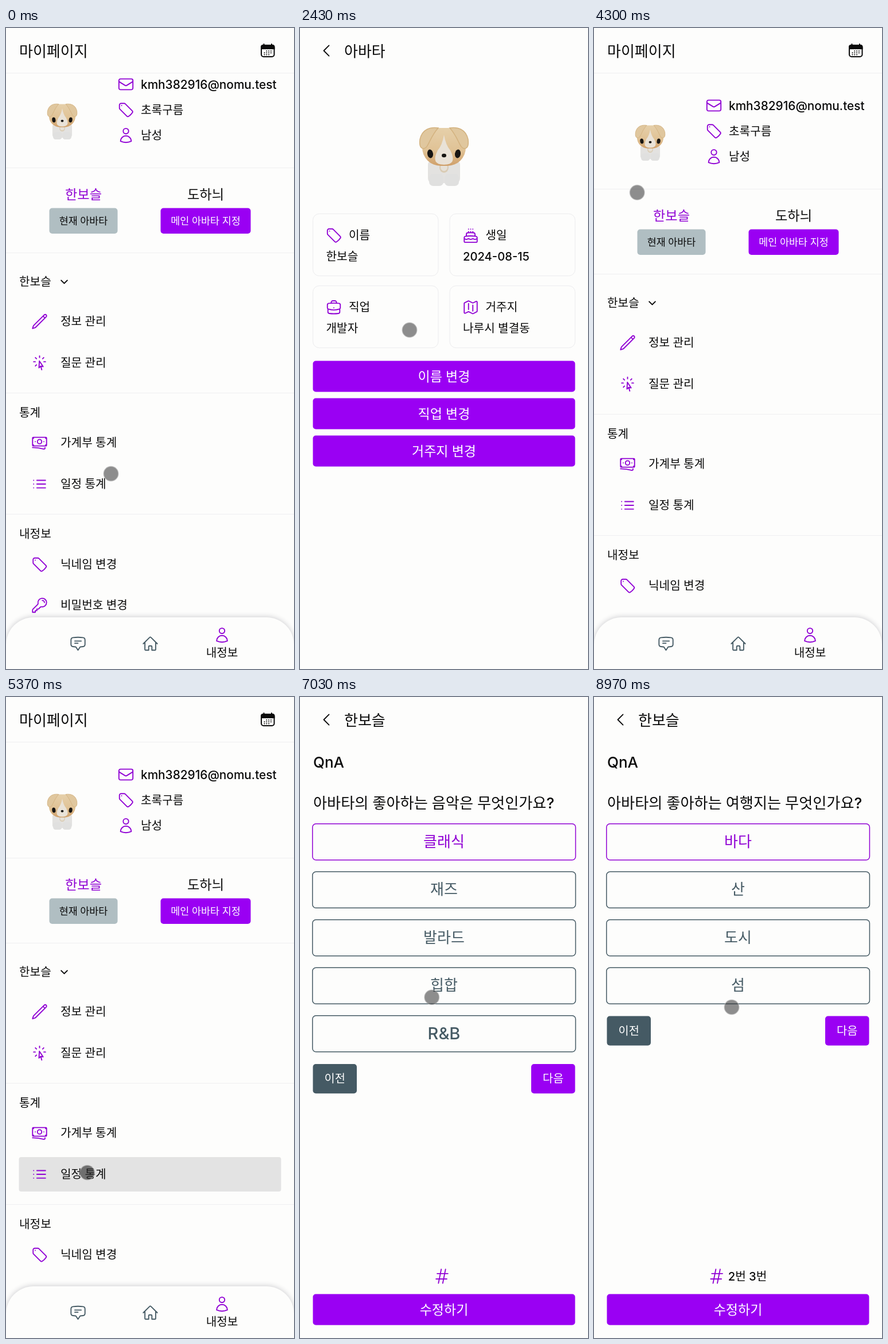
Recreate the animation shown at these times as an HTML page with a canvas. Size 502 px wide and 1116 px high, loop 9010 ms.

```html
<!DOCTYPE html>
<html lang="ko">
<head>
<meta charset="utf-8">
<style>
html, body { margin: 0; width: 100%; height: 100%; overflow: hidden; background: #fdfdfd; }
canvas { display: block; width: 502px; height: 1116px; }
</style>
</head>
<body>
<canvas id="stage" width="502" height="1116"></canvas>
<script>
const ctx = document.getElementById('stage').getContext('2d');
const LOOP = 9010;
const PAPER = '#fdfdfc', INK = '#0a0a0a', PURPLE = '#9a00f3', VIOLET = '#9000d4', SLATE = '#455a64', LINE = '#efeff1';
const FONT = 'Inter, "Noto Sans CJK KR", "Noto Sans CJK", sans-serif';
const USER = '한보슬', PARTNER = '도하늬';

const ICONS = {
  mail: 'M4.5 4.5h15a2.25 2.25 0 0 1 2.25 2.25v10.5a2.25 2.25 0 0 1-2.25 2.25h-15a2.25 2.25 0 0 1-2.25-2.25V6.75A2.25 2.25 0 0 1 4.5 4.5ZM2.25 7a2.3 2.3 0 0 0 1.07 1.9l7.5 4.6a2.25 2.25 0 0 0 2.36 0l7.5-4.6A2.3 2.3 0 0 0 21.75 7',
  tag: 'M9.57 3H5.25A2.25 2.25 0 0 0 3 5.25v4.32c0 .6.24 1.17.66 1.59l9.58 9.58c.7.7 1.78.87 2.6.33a18 18 0 0 0 5.23-5.22c.54-.83.37-1.91-.33-2.61L11.16 3.66A2.25 2.25 0 0 0 9.57 3ZM6 6h.01',
  user: 'M15.75 6a3.75 3.75 0 1 1-7.5 0 3.75 3.75 0 0 1 7.5 0ZM4.5 20.1a7.5 7.5 0 0 1 15 0A18 18 0 0 1 12 21.75 18 18 0 0 1 4.5 20.1Z',
  pencil: 'm16.86 4.49 1.69-1.69a1.87 1.87 0 1 1 2.65 2.65L6.83 19.82a4.5 4.5 0 0 1-1.9 1.13l-2.68.8.8-2.68a4.5 4.5 0 0 1 1.13-1.9L16.86 4.49Zm0 0L19.5 7.13',
  rays: 'M15.04 21.67 13.68 16.6m0 0-2.51 2.22.57-9.47 5.23 7.92-3.29-.67ZM12 2.25V4.5m5.83.17-1.59 1.59M20.25 10.5H18M7.76 14.74l-1.59 1.59M6 10.5H3.75m4-4.24-1.59-1.59',
  cash: 'M3.4 4.5h17.2a1.1 1.1 0 0 1 1.15 1.1v9.8a1.1 1.1 0 0 1-1.15 1.1H3.4a1.1 1.1 0 0 1-1.15-1.1V5.6A1.1 1.1 0 0 1 3.4 4.5ZM2.25 6H3a.75.75 0 0 0 .75-.75V4.5M20.25 4.5v.75A.75.75 0 0 0 21 6h.75M2.25 15H3a.75.75 0 0 1 .75.75v.75M20.25 16.5v-.75A.75.75 0 0 1 21 15h.75M15 10.5a3 3 0 1 1-6 0 3 3 0 0 1 6 0ZM6 10.5h.01M18 10.5h.01M2.25 18.75a60 60 0 0 1 15.8 2.1q1.45.25 1.45-1.1v-1',
  list: 'M8.25 6.75h12M8.25 12h12M8.25 17.25h12M3.75 6.75h.01M3.75 12h.01M3.75 17.25h.01',
  key: 'M15.75 5.25a3 3 0 0 1 3 3m3 0a6 6 0 0 1-7.03 5.9c-.56-.1-1.16.03-1.56.43L10.5 17.25H8.25v2.25H6v2.25H2.25v-2.8c0-.6.24-1.17.66-1.6l6.5-6.5c.4-.4.53-1 .43-1.56A6 6 0 1 1 21.75 8.25Z',
  cake: 'M6 13v-2.4a2.2 2.2 0 0 1 2-2.2q4-.3 8 0a2.2 2.2 0 0 1 2 2.2V13M9 8.25v-1.5M12 8.25v-1.5M15 8.25v-1.5M9 3.3h.01M12 3.3h.01M15 3.3h.01M3 20.6v-5.1a2.2 2.2 0 0 1 1.8-2.2q7.2-1.1 14.4 0a2.2 2.2 0 0 1 1.8 2.2v5.1a1.1 1.1 0 0 1-1.1 1.1H4.1A1.1 1.1 0 0 1 3 20.6ZM3 16.5l1.5.75q1.5.9 3 0t3 0 3 0 3 0 3 0L21 16.5',
  bag: 'M8.25 6.15v-.9A2.25 2.25 0 0 1 10.5 3h3a2.25 2.25 0 0 1 2.25 2.25v.9M4.8 6.5q7.2-.9 14.4 0A2.2 2.2 0 0 1 21 8.7v3.8q0 1.6-1.4 2-7.6 2.4-15.2 0Q3 14.1 3 12.5V8.7A2.2 2.2 0 0 1 4.8 6.5ZM3.75 14.2v4.2a2.2 2.2 0 0 0 1.9 2.2q6.35.8 12.7 0a2.2 2.2 0 0 0 1.9-2.2v-4.2M12 12.75h.01',
  map: 'M9 6.75V15m6-6v8.25m.5 3.5 4.88-2.44c.38-.19.62-.58.62-1V4.82c0-.84-.88-1.38-1.63-1l-3.87 1.93a1.1 1.1 0 0 1-1 0l-5-2.5a1.1 1.1 0 0 0-1 0L3.62 5.69C3.24 5.88 3 6.27 3 6.7v12.48c0 .84.88 1.38 1.63 1l3.87-1.93a1.1 1.1 0 0 1 1 0l5 2.5a1.1 1.1 0 0 0 1 0Z',
  chat: 'M7.5 8.25h9m-9 3H12M5 3.5q7-1 14 0a3.3 3.3 0 0 1 2.75 3.25v6A3.3 3.3 0 0 1 19 16q-1.7.25-3.4.37a1.1 1.1 0 0 0-.85.5L12 21l-2.75-4.13a1.1 1.1 0 0 0-.85-.5Q6.7 16.25 5 16a3.3 3.3 0 0 1-2.75-3.25v-6A3.3 3.3 0 0 1 5 3.5Z',
  home: 'm2.25 12 8.95-8.95a1.1 1.1 0 0 1 1.6 0L21.75 12M4.5 9.75v10.1A1.1 1.1 0 0 0 5.6 21h4.15v-4.9a1.1 1.1 0 0 1 1.1-1.1h2.3a1.1 1.1 0 0 1 1.1 1.1V21h4.15a1.1 1.1 0 0 0 1.1-1.1V9.75',
  hash: 'M5.25 8.25h15m-16.5 7.5h15m-1.8-13.5-3.9 19.5m-2.1-19.5-3.9 19.5',
  back: 'M15.75 19.5 8.25 12l7.5-7.5',
  down: 'm19.5 8.25-7.5 7.5-7.5-7.5'
};
for (const name in ICONS) ICONS[name] = new Path2D(ICONS[name]);

// Pointer stops: time, x, y
const STOPS = [
  [0, 183, 776], [450, 150, 513], [750, 150, 513], [1170, 281, 487], [1750, 255, 738], [2100, 255, 738],
  [3000, 46, 45], [3250, 46, 42], [3470, 47, 109], [3620, 46, 42], [3800, 46, 42], [5150, 140, 828],
  [5450, 142, 828], [6000, 213, 598], [6300, 160, 594], [6650, 160, 594], [7200, 250, 502], [7400, 250, 502],
  [7750, 442, 665], [7900, 442, 665], [8250, 270, 252], [8500, 270, 252], [8970, 240, 540], [LOOP, 237, 552]
];
const PRESSES = [[550, 700], [1850, 2000], [3100, 3250], [3660, 3760], [5200, 5500], [6400, 6560], [7280, 7380], [7780, 7880], [8320, 8430]];

const ease = (t, from, to) => {
  const p = Math.min(1, Math.max(0, (t - from) / (to - from)));
  return p * p * (3 - 2 * p);
};
const isPressed = t => PRESSES.some(([from, to]) => t >= from && t < to);

function text(str, x, y, size = 20.2, color = INK, align = 'left') {
  ctx.font = `500 ${size}px ${FONT}`;
  ctx.fillStyle = color;
  ctx.textAlign = align;
  ctx.fillText(str, x, y + size * 0.37);
}

function icon(name, x, y, color = VIOLET, size = 30, width = 1.5) {
  ctx.save();
  ctx.translate(x - size / 2, y - size / 2);
  ctx.scale(size / 24, size / 24);
  ctx.strokeStyle = color;
  ctx.lineWidth = width;
  ctx.lineCap = ctx.lineJoin = 'round';
  ctx.stroke(ICONS[name]);
  ctx.restore();
}

function box(x, y, w, h, r, fill, stroke, width = 1) {
  ctx.beginPath();
  ctx.roundRect(x, y, w, h, r);
  if (fill) { ctx.fillStyle = fill; ctx.fill(); }
  if (stroke) { ctx.strokeStyle = stroke; ctx.lineWidth = width; ctx.stroke(); }
}

function button(label, x, y, w, h, size, fill = PURPLE, color = '#fff') {
  box(x, y, w, h, 5, fill);
  text(label, x + w / 2, y + h / 2 - 0.5, size, color, 'center');
}

function oval(x, y, rx, ry, fill, turn = 0) {
  ctx.beginPath();
  ctx.ellipse(x, y, rx, ry, turn, 0, 7);
  ctx.fillStyle = fill;
  ctx.fill();
}

function divider(y) {
  ctx.fillStyle = LINE;
  ctx.fillRect(0, y, 502, 1);
}

function dog(x, y, scale) {
  ctx.save();
  ctx.translate(x, y);
  ctx.scale(scale, scale);
  box(-28, 6, 56, 40, 8, '#e3e2e0');
  box(-26, 30, 25, 21, 7, '#e0e0df');
  box(1, 30, 25, 21, 7, '#e0e0df');
  oval(0, 19, 8, 9, '#d9cbb3');
  oval(0, 18, 6, 7, '#e6e1d8');
  const fur = ctx.createLinearGradient(0, -50, 0, 16);
  fur.addColorStop(0, '#e6d0aa');
  fur.addColorStop(0.6, '#e0c295');
  fur.addColorStop(1, '#cf9f69');
  box(-38, -50, 76, 66, [30, 30, 32, 32], fur);
  ctx.fillStyle = '#e9e2d7';
  ctx.fill(new Path2D('M0-38Q3-20 11-11Q24 14 0 14Q-24 14-11-11Q-3-20 0-38Z'));
  for (const side of [-1, 1]) {
    ctx.save();
    ctx.scale(side, 1);
    ctx.fillStyle = '#e0c79e';
    ctx.strokeStyle = '#d3b27f';
    const ear = new Path2D('M10-50C24-52 38-48 42-30Q44-14 35-14C27-15 25-34 10-50Z');
    ctx.fill(ear);
    ctx.stroke(ear);
    oval(24, -5, 5, 7.5, '#171513', 0.15);
    ctx.restore();
  }
  oval(0, -2, 4, 3.3, '#171513');
  ctx.restore();
}

function calendar() {
  box(445, 30, 22.5, 20, 4, PAPER, INK, 2);
  box(444, 29, 24.5, 8, [4, 4, 0, 0], INK);
  box(448.5, 27, 2, 4, 1, INK);
  box(462, 27, 2, 4, 1, INK);
  for (let i = 0; i < 12; i++) {
    if (i !== 0 && i !== 11) oval(450.5 + i % 4 * 3.8, 40 + Math.floor(i / 4) * 3.2, 1, 1, INK);
  }
}

function myPage(t) {
  const scroll = t < 700 ? 37 : 27 * ease(t, 5600, 5980);
  ctx.save();
  ctx.translate(0, -scroll);
  if (t < 700 || t > 4000) dog(98, 200, 0.61);
  icon('mail', 209, 135);
  text('kmh382916@nomu.test', 235, 135, 20.8);
  icon('tag', 209, 179.5);
  text('초록구름', 235, 179.5);
  icon('user', 209, 224);
  text('남성', 235, 224);
  [280, 428, 672, 883].forEach(divider);
  text(USER, 135, 326, 23.2, VIOLET, 'center');
  text(PARTNER, 348, 326, 23.2, INK, 'center');
  button('현재 아바타', 75.5, 350.5, 119, 44.5, 17.4, '#b0bec2', INK);
  button('메인 아바타 지정', 269.5, 350.5, 157, 44.5, 17.4);
  text(USER, 23, 478.5);
  icon('down', 101.5, 479, INK, 17, 2.8);
  text('통계', 23, 706.5);
  text('내정보', 23, 917.5);
  const rows = [['pencil', '정보 관리', 548], ['rays', '질문 관리', 620], ['cash', '가계부 통계', 759],
    ['list', '일정 통계', 831], ['tag', '닉네임 변경', 971], ['key', '비밀번호 변경', 1042]];
  const active = !isPressed(t) ? -1 : t < 700 ? 0 : t > 6000 ? 1 : t > 5000 ? 3 : -1;
  rows.forEach(([name, label, y], i) => {
    if (i === active) box(22.5, y - 30, 457, 60, 4, '#e3e3e3');
    icon(name, 58.5, y);
    text(label, 95, y);
  });
  ctx.restore();

  ctx.fillStyle = PAPER;
  ctx.fillRect(0, 0, 502, 79);
  divider(78);
  text('마이페이지', 23, 40, 26);
  calendar();

  ctx.save();
  ctx.shadowColor = 'rgba(40,40,60,.22)';
  ctx.shadowBlur = 9;
  ctx.shadowOffsetY = -1;
  box(0, 1026, 502, 120, [48, 48, 0, 0], PAPER);
  ctx.restore();
  icon('chat', 125.5, 1072, SLATE);
  icon('home', 251.5, 1072, SLATE);
  icon('user', 376.5, 1057);
  text('내정보', 376.5, 1088, 20.2, INK, 'center');
}

function subHeader(title) {
  icon('back', 46, 39.5, INK, 29, 1.5);
  text(title, 77, 40, 26);
}

function avatarPage(t) {
  subHeader('아바타');
  if (t > 900 && t < 3250) dog(251, 224, 1);
  const cards = [['tag', '이름', USER], ['cake', '생일', '2024-08-15'], ['bag', '직업', '개발자'], ['map', '거주지', '나루시 별결동']];
  cards.forEach(([name, label, value], i) => {
    const x = 22.5 + i % 2 * 238.5, y = 323.5 + (i >> 1) * 125.3;
    box(x, y, 218.5, 108, 11, null, '#ececee');
    icon(name, x + 36.5, y + 37.5);
    text(label, x + 62.5, y + 37);
    text(value, x + 23, y + 74);
  });
  ['이름', '직업', '거주지'].forEach((what, i) => button(what + ' 변경', 22.5, 579.5 + i * 65, 457, 54, 23));
}

function quizPage(t) {
  const second = t < 7880;
  const options = second ? ['클래식', '재즈', '발라드', '힙합', 'R&B'] : ['바다', '산', '도시', '섬'];
  const chosen = second ? (t < 7380 ? 0 : 3) : (t < 8430 ? 1 : 0);
  const edited = t < 7380 ? '' : t < 8430 ? '2번' : '2번 3번';
  subHeader(USER);
  text('QnA', 23, 113, 26);
  text(`아바타의 좋아하는 ${second ? '음악은' : '여행지는'} 무엇인가요?`, 23, 184, 26.2);
  options.forEach((label, i) => {
    const y = 220.8 + i * 83.5;
    const color = i === chosen ? VIOLET : SLATE;
    box(21.8, y, 458.6, 63, 6, null, color, 1.5);
    text(label, 251, y + 30.5, label === 'R&B' ? 29 : 26, color, 'center');
  });
  const y = 221.5 + options.length * 83.5;
  button('이전', 22.5, y, 76.5, 51.3, 19.8, SLATE);
  button('다음', 403, y, 76.5, 51.3, 19.8);
  ctx.font = `500 20.2px ${FONT}`;
  const x = 267.5 - ctx.measureText(edited).width / 2;
  icon('hash', x - 20, 1008.5);
  text(edited, x, 1008.5);
  button('수정하기', 22.5, 1039.5, 457, 54, 23);
}

function pointer(t) {
  const next = Math.max(1, STOPS.findIndex(stop => stop[0] > t));
  const [t0, x0, y0] = STOPS[next - 1], [t1, x1, y1] = STOPS[next];
  const p = ease(t, t0, t1);
  ctx.beginPath();
  ctx.arc(x0 + (x1 - x0) * p, y0 + (y1 - y0) * p, 12.8, 0, 7);
  ctx.fillStyle = isPressed(t) ? 'rgba(45,45,45,.64)' : 'rgba(50,50,50,.55)';
  ctx.fill();
  ctx.strokeStyle = 'rgba(185,185,185,.6)';
  ctx.lineWidth = 1.5;
  ctx.stroke();
}

function draw(now) {
  const t = now % LOOP;
  ctx.fillStyle = PAPER;
  ctx.fillRect(0, 0, 502, 1116);
  if (t >= 6560) quizPage(t);
  else if (t >= 700 && t < 3760) avatarPage(t);
  else myPage(t);
  pointer(t);
}

const start = performance.now();
(function frame() {
  draw(performance.now() - start);
  requestAnimationFrame(frame);
})();
</script>
</body>
</html>
```
